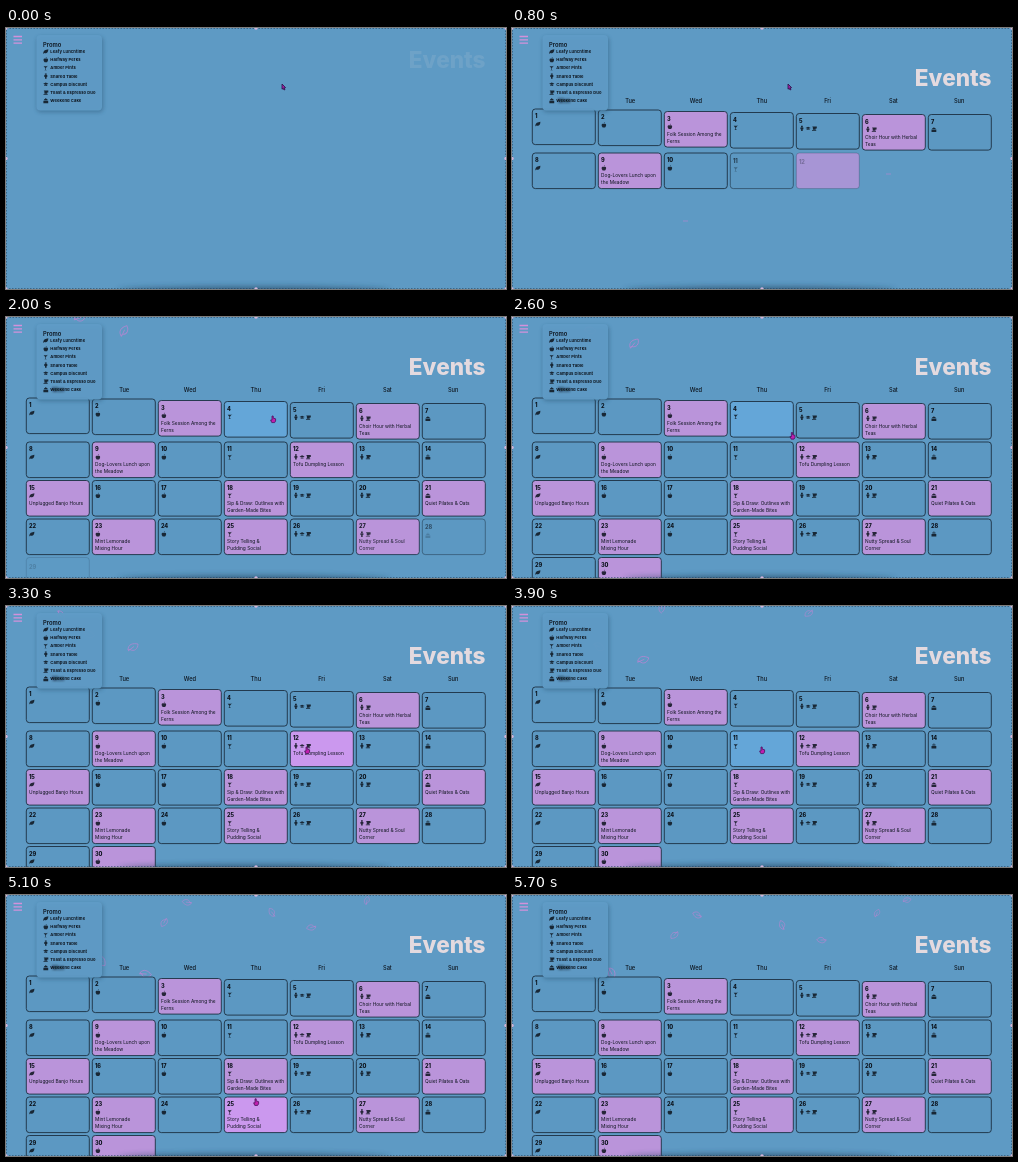
Write an HTML page that moves like this. It is 500 by 261 pixels and loops after 5800 ms.

```html
<!DOCTYPE html>
<html lang="en">
<head>
<meta charset="utf-8">
<title>Events calendar</title>
<style>
  html, body { margin: 0; width: 100%; height: 100%; overflow: hidden; background: #5e9ac4; }
  svg { display: block; width: 100vw; height: 100vh; font-family: Inter, "Open Sans", sans-serif; fill: #0c131c; }
  .box { fill: #5c98c2; stroke: #1c3042; stroke-width: .9; }
  .pink .box { fill: #ba94da; }
  .hover .box { fill: #64a6d8; }
  .pink.hover .box { fill: #cb98ee; }
  .num { font-size: 5.6px; font-weight: 800; }
  .event { font-size: 4.8px; }
  .day { font-size: 5.7px; font-weight: 500; text-anchor: middle; }
  .promo { font-size: 5.8px; font-weight: 600; }
  .item { font-size: 4.1px; font-weight: 700; letter-spacing: .1px; }
  .title { font-size: 22.6px; font-weight: 800; text-anchor: end; fill: #e4dadf; }
  .leaf { fill: none; stroke: #bd83d2; stroke-width: .9; }
</style>
</head>
<body>
<svg id="stage" viewBox="0 0 500 261" preserveAspectRatio="none">
  <defs>
    <filter id="blur" x="-20%" y="-200%" width="140%" height="500%"><feGaussianBlur stdDeviation="3"/></filter>
    <filter id="soft" x="-20%" y="-20%" width="140%" height="150%"><feGaussianBlur stdDeviation="2.2"/></filter>
    <filter id="glass" x="-50%" y="-50%" width="200%" height="200%"><feGaussianBlur stdDeviation="1.2"/></filter>
  </defs>
  <rect width="500" height="261" fill="#5e9ac4"/>
</svg>
<script>
const LOOP = 5800, STEP = 100;
const stage = document.getElementById('stage');

const ICONS = {
  leaf: 'M-2.5 2.4C-2.8-1.4 0-1.8 2.5-2.3C2.5 1 .8 2.4-1.5 1.4Z',
  apple: 'M0-1C2.7-1.8 2.9.8 1.2 2.5H-1.2C-2.9.8-2.7-1.8 0-1ZM0-1.2L1-2.7L.1-2.5Z',
  drink: 'M-2.2-1.7H1.3L2.4-2.5L1-.9L.1.2V2H.8V2.4H-1.2V2H-.5V.2Z',
  family: 'M-.9-2.7H.9V-1.3H-.9ZM-1.5-1H1.5V.8H.8V2.6H-.8V.8H-1.5Z',
  cap: 'M-2.6-.6L0-1.7L2.6-.6L0 .6ZM-1.4.4L0 1.1L1.4.4V1.6H-1.4Z',
  cup: 'M-1.9-2H2.5V.1H1.4V1.2H-1.4V-1.2H-1.9ZM-2.3 1.6H1.9V2.2H-2.3Z',
  cake: 'M-2.4 0H2.4V2.5H-2.4ZM-1.6-1.6H1.6V-.4H-1.6ZM-.4-2.6H.4V-1.8H-.4Z'
};
const DAYS = ['Mon', 'Tue', 'Wed', 'Thu', 'Fri', 'Sat', 'Sun'];
const DAY_ICONS = [['leaf'], ['apple'], ['apple'], ['drink'], ['family', 'cap', 'cup'], ['family', 'cup'], ['cake']];
const FIRST_ROW = [81, 82, 83.5, 84.5, 85.5, 86.5, 86.5];
const CELL_W = 63, CELL_H = 35.6;
const PROMOS = ['Leafy Lunchtime', 'Halfway Perks', 'Amber Pints', 'Shared Table',
  'Campus Discount', 'Toast & Espresso Duo', 'Weekend Cake'];
const EVENTS = {
  3: ['Folk Session Among the', 'Ferns'],
  6: ['Choir Hour with Herbal', 'Teas'],
  9: ['Dog-Lovers Lunch upon', 'the Meadow'],
  12: ['Tofu Dumpling Lesson'],
  15: ['Unplugged Banjo Hours'],
  18: ['Sip & Draw: Outlines with', 'Garden-Made Bites'],
  21: ['Quiet Pilates & Oats'],
  23: ['Mint Lemonade', 'Mixing Hour'],
  25: ['Story Telling &', 'Pudding Social'],
  27: ['Nutty Spread & Soul', 'Corner'],
  30: []
};
// x, y, time at that place, size
const LEAVES = [
  [127, 41, 3300, 1], [83, 28, 3300, 1], [55, 10, 3300, 1],
  [154, 15, 4500, .8], [301, 20, 4500, .8],
  [185, 20, 5700, .8], [270, 30, 5700, .8], [365, 18, 5700, .7], [395, 5, 5700, .7]
];
// time, x, y
const PATH = [[0, 276, 56], [1400, 276, 56], [1900, 267, 99], [2300, 267, 99], [3000, 301, 141],
  [3500, 301, 141], [3900, 250, 141], [4200, 250, 141], [4500, 250, 180], [4900, 250, 180],
  [5500, 250, 272], [LOOP, 250, 272]];

const clamp = v => Math.max(0, Math.min(1, v));
const ease = v => v * v * (3 - 2 * v);

function add(parent, tag, attrs = {}, text) {
  const el = document.createElementNS('http://www.w3.org/2000/svg', tag);
  for (const k in attrs) el.setAttribute(k, attrs[k]);
  if (text !== undefined) el.textContent = text;
  parent.append(el);
  return el;
}
const label = (parent, cls, x, y, text) => add(parent, 'text', { class: cls, x, y }, text);
const icon = (parent, name, x, y) =>
  add(parent, 'path', { d: ICONS[name], transform: `translate(${x} ${y})`, opacity: .85 });

const leaves = LEAVES.map(([x, y, at, size], i) => ({
  x, y, at, size, i,
  el: add(stage, 'path', { class: 'leaf', d: 'M-5 3C-5-3 0-4 5-3C5 2 1 5-3 2.5ZM-5 4L1-.5' })
}));
const specks = add(stage, 'path', { d: 'M171 193h5M374 146h5', stroke: '#bd83d2', 'stroke-width': 1 });

const title = label(stage, 'title', 479.5, 58.2, 'Events');

const cells = Array.from({ length: 30 }, (_, i) => {
  const n = i + 1, col = i % 7, row = Math.floor(i / 7);
  const x = 20.3 + col * 66, y = row ? 125 + (row - 1) * 38.5 : FIRST_ROW[col];
  const g = add(stage, 'g', { class: EVENTS[n] ? 'pink' : '' });
  const box = add(g, 'rect', { class: 'box', x, y, width: CELL_W, height: CELL_H, rx: 3 });
  const body = add(g, 'g');
  label(body, 'num', x + 2.6, y + 9, n);
  const detail = add(body, 'g');
  DAY_ICONS[col].forEach((name, k) => icon(detail, name, x + 5.6 + k * 6.2, y + 15));
  (EVENTS[n] || []).forEach((line, k) => label(detail, 'event', x + 2.8, y + 24.2 + k * 7, line));
  return { g, box, body, detail, x, y, start: Math.max(20, 740 + (n - 12) * 72) };
});

const card = add(stage, 'g');
add(card, 'rect', { x: 31, y: 9, width: 66, height: 75, rx: 4, fill: '#244b69', opacity: .45, filter: 'url(#soft)' });
add(card, 'rect', { x: 30.5, y: 7, width: 65.5, height: 75.5, rx: 4, fill: '#609dc7', opacity: .93 });

// the first heading shows through the card as frosted glass
const head = add(stage, 'g');
DAYS.forEach((d, i) => {
  const el = label(head, 'day', 52.4 + i * 65.8, 75, d);
  if (!i) el.setAttribute('filter', 'url(#glass)');
});

label(stage, 'promo', 37, 18.6, 'Promo');
PROMOS.forEach((text, i) => {
  const y = 23.5 + i * 8.2;
  icon(stage, Object.keys(ICONS)[i], 39.8, y);
  label(stage, 'item', 44.3, y + 1.5, text);
});

add(stage, 'path', { d: 'M7.5 8.5h8.5M7.5 11.8h8.5M7.5 15.1h8.5', stroke: '#d391da', 'stroke-width': 1.3 });
add(stage, 'ellipse', { cx: 248, cy: 263, rx: 136, ry: 4, fill: '#1d3b54', opacity: .65, filter: 'url(#blur)' });
add(stage, 'rect', { x: .5, y: .5, width: 499, height: 260, fill: 'none', stroke: '#264660',
  'stroke-width': .8, 'stroke-dasharray': '1.5 1.5', opacity: .75 });
for (const [x, y] of [[0, 0], [250, 0], [500, 0], [0, 130.5], [500, 130.5], [0, 261], [250, 261], [500, 261]])
  add(stage, 'circle', { cx: x, cy: y, r: 1.7, fill: '#d5b4da' });

const cursor = add(stage, 'g');
const arrow = add(cursor, 'path', { d: 'M0 0L0 5.2L1.2 4.2L2 6L3 5.5L2.2 3.8L3.6 3.6Z',
  fill: '#a022a4', stroke: '#2a1048', 'stroke-width': .8 });
const hand = add(cursor, 'path', { d: 'M-1 0H.2V2.1L2.6 2.8V5L1.6 6.6H-1.2L-2.4 4L-1 4Z',
  fill: '#c01fae', stroke: '#4a1260', 'stroke-width': .8 });

function cursorAt(t) {
  const k = Math.max(1, PATH.findIndex(p => p[0] > t));
  const [a, b] = [PATH[k - 1], PATH[k]];
  const p = ease(clamp((t - a[0]) / (b[0] - a[0])));
  return [a[1] + (b[1] - a[1]) * p, a[2] + (b[2] - a[2]) * p];
}

function draw(t) {
  const intro = clamp((t + 60) / 500);
  title.setAttribute('opacity', intro);
  title.setAttribute('transform', `translate(0 ${-21 * (1 - intro)})`);
  head.setAttribute('opacity', clamp(t / 300));
  specks.setAttribute('opacity', t >= 600 && t < 1100 ? .6 : 0);

  const [cx, cy] = cursorAt(t);
  let over = false;
  for (const c of cells) {
    // the fill arrives first, then the outline and the contents
    const age = t - c.start, p = clamp(age / 200);
    c.box.setAttribute('fill-opacity', clamp(age / 75));
    c.box.setAttribute('stroke-opacity', p);
    c.body.setAttribute('opacity', p);
    c.body.setAttribute('transform', `translate(0 ${3 * (1 - p)})`);
    c.detail.setAttribute('opacity', clamp((age - 60) / 110));
    const hit = p === 1 && cx > c.x && cx < c.x + CELL_W && cy > c.y && cy < c.y + CELL_H;
    c.g.classList.toggle('hover', hit);
    over = over || hit;
  }
  cursor.setAttribute('transform', `translate(${cx} ${cy})`);
  arrow.setAttribute('opacity', over ? 0 : 1);
  hand.setAttribute('opacity', over ? 1 : 0);

  for (const l of leaves) {
    const s = (t - l.at) / 1000;
    const turn = l.i * 47 + s * 22;
    l.el.setAttribute('transform', `translate(${l.x + s * 7} ${l.y + s * 21}) rotate(${turn}) scale(${l.size})`);
    l.el.setAttribute('opacity', .75 * clamp((t - 900) / 600));
  }
}

const begin = performance.now();
function tick() {
  const t = (performance.now() - begin) % LOOP;
  draw(Math.floor(t / STEP) * STEP);
  requestAnimationFrame(tick);
}
tick();
</script>
</body>
</html>
```
